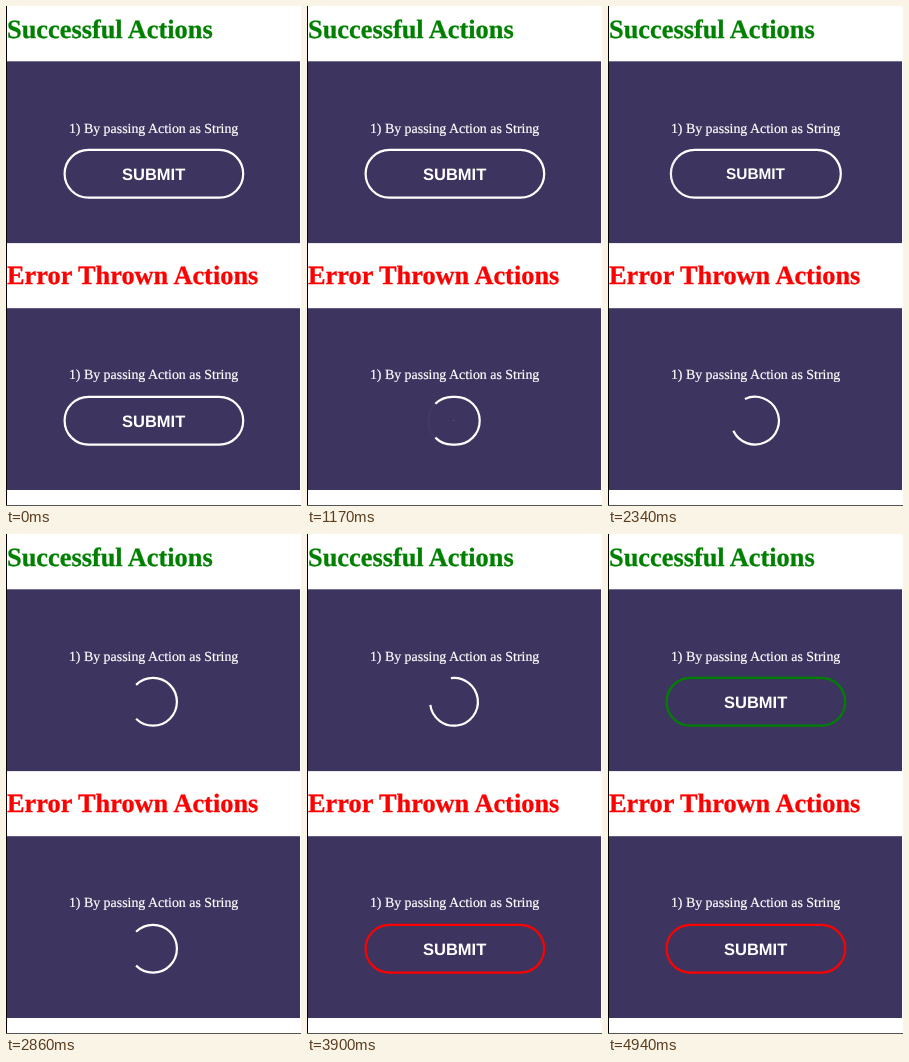
Animation of 295x500 px, one loop 6370 ms. Source, as an HTML page:

```html
<!DOCTYPE html>
<html lang="en">
<head>
<meta charset="utf-8">
<title>Submit buttons</title>
<style>
  html, body { margin: 0; width: 100%; height: 100%; overflow: hidden; background: #fff; }
  svg { display: block; width: 100%; height: 100%; }
  text { font-family: "Liberation Serif", "Times New Roman", serif; text-rendering: geometricPrecision; }
  .title { font-size: 26.35px; font-weight: bold; stroke-width: .3; }
  .note { font-size: 13.9px; fill: #fff; stroke: #fff; stroke-width: .2; text-anchor: middle; }
  .label { font-family: "Liberation Sans", Arial, sans-serif; font-weight: bold; fill: #fff; text-anchor: middle; }
  .ring path { fill: none; stroke-width: 2.2; }
</style>
</head>
<body>
<svg id="stage" viewBox="0 0 295 500" preserveAspectRatio="none"></svg>
<script>
const LOOP = 6370, STEP = 130;
const MORPH = 500, RESOLVE = 2085;
const SPIN_DELAY = 805, SPIN_PERIOD = 720;
const CX = 147.9, SPIN_CX = 147, FULL = 180.6, SIZE = 49.8, FONT = 16.5;
const WHITE = [255, 255, 255];

const stage = document.getElementById('stage');

function add(parent, tag, attrs, text) {
  const el = document.createElementNS('http://www.w3.org/2000/svg', tag);
  for (const key in attrs) el.setAttribute(key, attrs[key]);
  if (text) el.textContent = text;
  parent.appendChild(el);
  return el;
}

const clamp = x => Math.min(1, Math.max(0, x));
const mix = (a, b, p) => a + (b - a) * p;
const rgb = c => `rgb(${c.map(Math.round)})`;

// cubic-bezier(.25, .1, .25, 1)
function ease(x) {
  if (x <= 0 || x >= 1) return clamp(x);
  const curve = (a, b, s) => 3 * a * s * (1 - s) ** 2 + 3 * b * s * s * (1 - s) + s ** 3;
  let lo = 0, hi = 1;
  for (let i = 0; i < 24; i++) {
    const mid = (lo + hi) / 2;
    if (curve(.25, .25, mid) < x) lo = mid; else hi = mid;
  }
  return curve(.1, 1, lo);
}

function makeSection(textTop, boxTop, title, color, start) {
  const paint = rgb(color);
  add(stage, 'text', { class: 'title', x: 1, y: textTop + 32, fill: paint, stroke: paint }, title);
  add(stage, 'rect', { x: 1, y: boxTop, width: 293, height: 181.8, fill: '#3d355f' });
  add(stage, 'text', { class: 'note', x: 147.6, y: textTop + 127 }, '1) By passing Action as String');
  const ring = add(stage, 'g', { class: 'ring' });
  return {
    cy: boxTop + 112.5, color, start, ring,
    body: add(ring, 'path', {}),
    left: add(ring, 'path', {}),
    label: add(stage, 'text', { class: 'label' }, 'SUBMIT')
  };
}

function drawButton(b, time) {
  const t = time - b.start;
  const shrink = ease(t / MORPH);
  const grow = ease((t - RESOLVE) / MORPH);
  const done = t >= RESOLVE;
  const open = done ? grow : 1 - shrink;
  const spin = !done && t > SPIN_DELAY ? (t - SPIN_DELAY) / SPIN_PERIOD * 360 : 0;

  const cx = mix(SPIN_CX, CX, open);
  const r = SIZE / 2 - 1;
  const half = mix(SIZE, FULL, open) / 2 - 1;
  const d = r * Math.SQRT1_2;
  const x0 = cx - half + r, x1 = cx + half - r;
  const y0 = b.cy - r, y1 = b.cy + r;
  const arc = (x, y) => `A${r} ${r} 0 0 1 ${x} ${y}`;

  b.body.setAttribute('d', `M${x0 - d} ${b.cy - d}${arc(x0, y0)}H${x1}${arc(x1, y1)}H${x0}${arc(x0 - d, b.cy + d)}`);
  b.body.setAttribute('stroke', rgb(WHITE.map((c, i) => mix(c, b.color[i], grow))));
  b.left.setAttribute('d', `M${x0 - d} ${b.cy + d}${arc(x0 - d, b.cy - d)}`);
  b.left.setAttribute('stroke', rgb(done ? b.color : WHITE));
  b.left.setAttribute('stroke-opacity', open);
  b.ring.setAttribute('transform', `rotate(${spin} ${cx} ${b.cy})`);

  const size = FONT * open;
  b.label.setAttribute('x', cx - .3);
  b.label.setAttribute('y', b.cy + size * .36);
  b.label.style.fontSize = size + 'px';
  b.label.style.display = size > .1 ? '' : 'none';
}

const buttons = [
  makeSection(0, 55.3, 'Successful Actions', [0, 128, 0], 2300),
  makeSection(246, 302.2, 'Error Thrown Actions', [255, 0, 0], 775)
];
add(stage, 'path', { d: 'M.5 0V500', stroke: '#000' });
add(stage, 'path', { d: 'M0 499.5H295', stroke: '#555' });

function render(time) {
  const t = Math.floor(time % LOOP / STEP) * STEP;
  buttons.forEach(b => drawButton(b, t));
}

const origin = performance.now();
function tick() {
  render(performance.now() - origin);
  requestAnimationFrame(tick);
}
tick();
</script>
</body>
</html>
```
